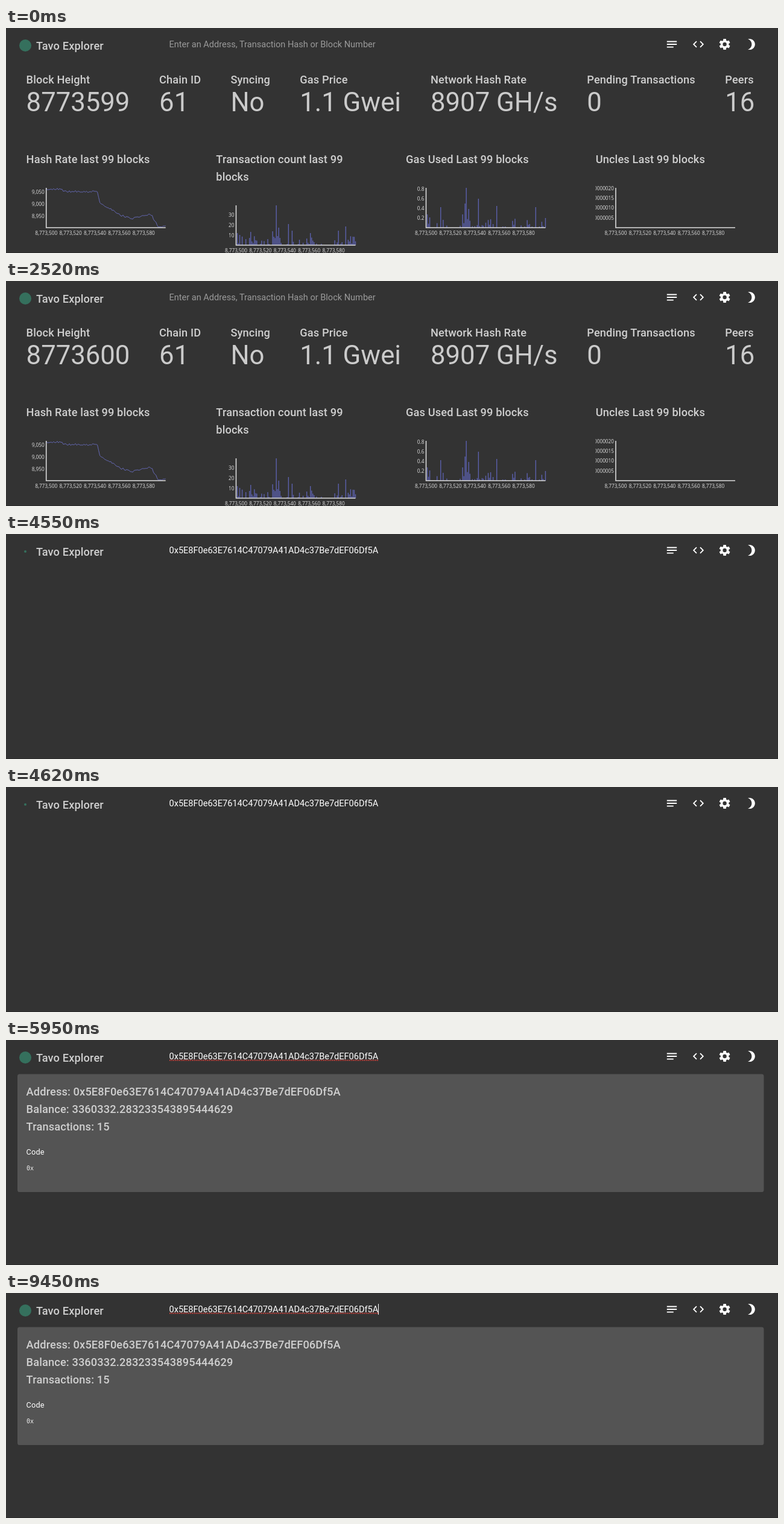
Animation of 1280x373 px, one loop 9.52 s. Source, as an HTML page:

```html
<!DOCTYPE html>
<html lang="en">
<head>
<meta charset="utf-8">
<title>Block explorer</title>
<style>
  html, body { margin: 0; width: 100%; height: 100%; overflow: hidden; background: #333; }
  svg { display: block; width: 1280px; height: 373px; }
  text { font-family: Roboto, sans-serif; white-space: pre; }
  .h6 { font-size: 18.2px; font-weight: 500; letter-spacing: .137px; fill: #cfcfcf; }
  .h3 { font-size: 43.68px; fill: #cbcbcb; }
  .field { font-size: 14.56px; fill: #fff; }
  .hint { font-size: 14.56px; fill: #9a9a9a; }
  .body { font-size: 12.74px; letter-spacing: .137px; fill: #fff; }
  .mono { font: 10px "DejaVu Sans Mono", monospace; fill: #eee; }
  .tick { font: 8.25px "Open Sans", sans-serif; fill: #dedede; }
  .end { text-anchor: end; }
  .mid { text-anchor: middle; }
  .axis { fill: none; stroke: #dcdcdc; stroke-width: 1.6; }
  .plot { fill: none; stroke: #6468b4; stroke-width: 1; }
  .bars { fill: none; stroke: #5b60ac; stroke-width: 1.4; }
</style>
</head>
<body>
<svg id="stage" viewBox="0 0 1280 373" xmlns="http://www.w3.org/2000/svg"></svg>
<script>
const LOOP = 9520;
const NEW_BLOCK = 1050, PASTE = 3990, CLEAR = 4340, RESULT = 5950;
const BLINK = 1050, BLINK_ON = 560;
const ADDRESS = "0x5E8F0e63E7614C47079A41AD4c37Be7dEF06Df5A";
const SLOT = 2.02; // chart pixels per block

const text = (x, y, cls, str, id = "") =>
  `<text x="${x}" y="${y}" class="${cls}"${id && ` id="${id}"`}>${str}</text>`;
const group = (id, body) => `<g id="${id}">${body}</g>`;
const icon = (x, body) =>
  `<g transform="translate(${x - 10.92} 16.1) scale(.91)" fill="#fff">${body}</g>`;
const path = d => `<path d="${d}"/>`;
const random = seed => () => (seed = seed * 16807 % 2147483647) / 2147483647;

function gear() {
  let s = '<circle cx="12" cy="12" r="5.5" fill="none" stroke="#fff" stroke-width="4"/>';
  for (let a = 0; a < 360; a += 60)
    s += `<path d="M9.1 6L9.5 2.4Q9.6 2 10 2H14Q14.4 2 14.5 2.4L14.9 6Z" transform="rotate(${a} 12 12)"/>`;
  return s;
}

function header() {
  return '<circle id="logo" cx="32" cy="29" fill="#35705d"/>' +
    text(50, 36.3, "h6", "Tavo Explorer") +
    text(270.5, 32, "hint", "Enter an Address, Transaction Hash or Block Number", "hint") +
    text(270.5, 32, "field", ADDRESS, "field") +
    '<line id="spell" x1="271" x2="618" y1="33.7" y2="33.7" stroke="#d8453f" stroke-width="1.8" stroke-dasharray="1.9 1.2"/>' +
    '<rect id="caret" x="617" y="18" width="1" height="18" fill="#fff"/>' +
    icon(1104, path("M3 18h12v-2H3zM3 6v2h18V6zM3 13h18v-2H3z")) +
    icon(1148, path("M9.4 16.6L4.8 12l4.6-4.6L8 6l-6 6 6 6zM14.6 16.6l4.6-4.6-4.6-4.6L16 6l6 6-6 6z")) +
    icon(1191.6, gear()) +
    icon(1235.5, path("M9 2c-1.05 0-2.05.16-3 .46 4.06 1.27 7 5.06 7 9.54 0 4.48-2.94 8.27-7 9.54.95.3 1.95.46 3 .46 5.52 0 10-4.48 10-10S14.52 2 9 2z"));
}

function stats() {
  return [
    [33.6, "Block Height", "8773599", "height"],
    [254.1, "Chain ID", "61"],
    [372.4, "Syncing", "No"],
    [487.2, "Gas Price", "1.1 Gwei"],
    [704, "Network Hash Rate", "8907 GH/s"],
    [963.3, "Pending Transactions", "0"],
    [1192.3, "Peers", "16"]
  ].map(([x, name, value, id]) =>
    text(x, 92.2, "h6", name) + text(x, 138.2, "h3", value, id)).join("");
}

// Axes with ticks; y ticks start at the top one and step down evenly.
function axes(x, top, labels, first, step) {
  const base = top + 66;
  let s = `<path class="axis" d="M${x} ${top}V${base}H${x + 198}"/>`;
  labels.forEach((l, i) => s += text(x - 3, first + i * step + 3, "tick end", l));
  for (let i = 0; i < 100; i += 20)
    s += text(x + i * SLOT, base + 11.5, "tick mid", (8773500 + i).toLocaleString("en-US"));
  return s;
}

// Jittered walk along a few key levels, given as [block, y].
function rateLine(x, keys, seed) {
  const rnd = random(seed);
  let d = "", k = 0;
  for (let i = 0; i < 99; i++) {
    if (i > keys[k + 1][0]) k++;
    const [[a, ya], [b, yb]] = [keys[k], keys[k + 1]];
    const y = ya + (yb - ya) * (i - a) / (b - a) + (rnd() - .5) * 3;
    d += `${x + i * SLOT},${Math.min(330, Math.max(265, y))} `;
  }
  return `<polyline class="plot" points="${d}"/>`;
}

// Seeded short bars, denser around the main peak, plus the tall ones as [block, height].
function bars(x, base, tall, seed) {
  const rnd = random(seed);
  let d = "";
  const bar = (i, h) => d += `M${x + i * SLOT} ${base}v${-h}`;
  for (let i = 1; i < 99; i++) {
    const near = Math.abs(i - 33) < 4, r = rnd(), h = rnd();
    if (near || r < .38) bar(i, 2 + 13 * (near ? Math.sqrt(h) : h * h));
  }
  tall.forEach(([i, h]) => bar(i, h));
  return `<path class="bars" d="${d}"/>`;
}

function charts() {
  const rate = [[0, 267], [12, 267], [15, 271], [42, 271], [44, 290], [61, 310],
    [70, 316], [86, 309], [92, 329], [98, 328]];
  const txCount = [[1, 20], [3, 17], [12, 22], [30, 23], [33, 66], [35, 29],
    [43, 35], [46, 24], [61, 20], [84, 24], [90, 31]];
  const gas = [[1, 22], [3, 17], [12, 34], [30, 22], [32, 40], [33, 66], [35, 31],
    [43, 48], [58, 36], [90, 34], [98, 16]];
  return text(33.6, 223.7, "h6", "Hash Rate last 99 blocks") +
    text(348.3, 223.7, "h6", "Transaction count last 99") +
    text(348.3, 252.8, "h6", "blocks") +
    text(663, 223.7, "h6", "Gas Used Last 99 blocks") +
    text(977.7, 223.7, "h6", "Uncles Last 99 blocks") +
    rateLine(66.7, rate, 91) +
    axes(66.7, 265, ["9,050", "9,000", "8,950"], 272, 20.2) +
    bars(381.5, 360, txCount, 77) +
    axes(381.5, 294, [30, 20, 10], 310, 16.8) +
    bars(696.5, 331, gas, 4242) +
    axes(696.5, 265, ["0.8", "0.6", "0.4", "0.2"], 267, 16.1) +
    '<clipPath id="cut"><rect x="977.5" y="255" width="300" height="118"/></clipPath>' +
    `<g clip-path="url(#cut)">${
      axes(1011, 265, ["0.0000020", "0.0000015", "0.0000010", "0.0000005"], 265.5, 16.4)}</g>`;
}

function result() {
  return '<rect x="19" y="56.5" width="1237.5" height="195.5" rx="3.6" fill="#545454"/>' +
    text(33.6, 92.2, "h6", "Address: " + ADDRESS) +
    text(33.6, 121.3, "h6", "Balance: 3360332.283233543895444629") +
    text(33.6, 150.4, "h6", "Transactions: 15") +
    text(33.6, 190.4, "body", "Code") +
    text(34, 216, "mono", "0x");
}

document.getElementById("stage").innerHTML =
  '<rect width="1280" height="373" fill="#333"/>' +
  '<path d="M1279.5 0V373M0 372.5H1280" stroke="#2b2b2b"/>' +
  header() + group("home", stats() + charts()) + group("result", result());

const el = id => document.getElementById(id);
const show = (id, on) => el(id).setAttribute("visibility", on ? "visible" : "hidden");

function draw(t) {
  const pasted = t >= PASTE, done = t >= RESULT;
  const loading = t >= CLEAR && !done;
  el("height").textContent = t < NEW_BLOCK ? "8773599" : "8773600";
  el("logo").setAttribute("r", loading ? 2 : 10);
  show("hint", !pasted);
  show("field", pasted);
  show("spell", done);
  show("caret", pasted && (t - PASTE) % BLINK < BLINK_ON);
  show("home", t < CLEAR);
  show("result", done);
}

const start = performance.now();
function tick() {
  draw((performance.now() - start) % LOOP);
  requestAnimationFrame(tick);
}
tick();
</script>
</body>
</html>
```
